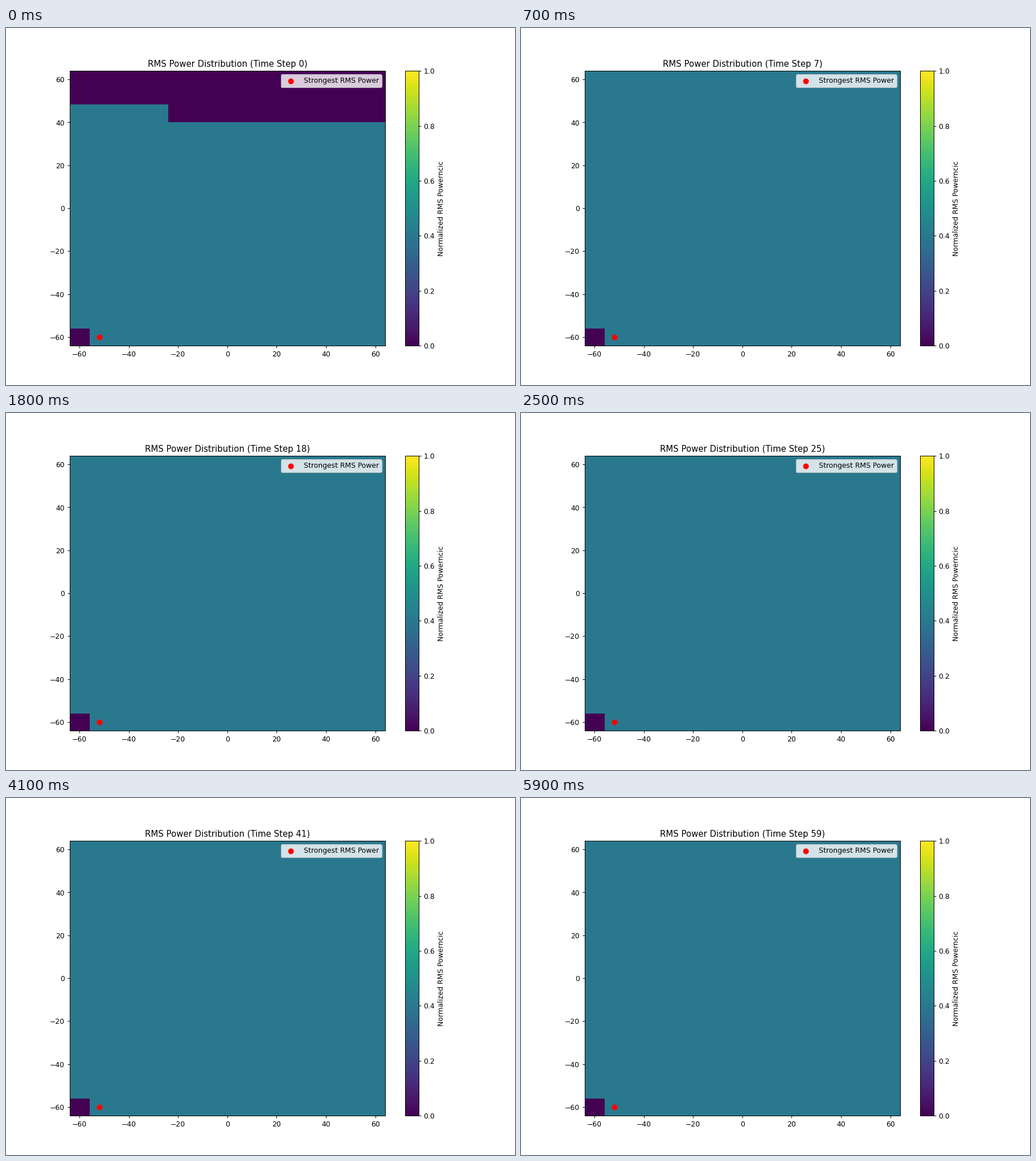
A matplotlib script that plays this animation: 894x626 px, repeating every 6 s.

```python
import numpy as np
import matplotlib.pyplot as plt
from matplotlib.animation import FuncAnimation

STEPS = 60
SIDE = 16           # sensors per row
HALF = 64           # half width of the field
BASE = 0.4          # steady power level
FIRST_REPORT = 213  # sensors heard from at the first step
PEAK_STEP = 11

plt.rcParams["font.family"] = "DejaVu Sans"


def power(step):
    """Normalized power of every sensor; sensor 0 stays silent."""
    cells = np.full(SIDE * SIDE, BASE)
    cells[0] = 0
    if step == 0:
        cells[FIRST_REPORT:] = 0
    if step == PEAK_STEP:
        cells[1] = 1
    return cells.reshape(SIDE, SIDE)


def strongest(grid):
    """Centre of the cell with the highest power."""
    row, col = np.unravel_index(grid.argmax(), grid.shape)
    size = 2 * HALF / SIDE
    return (col + 0.5) * size - HALF, (row + 0.5) * size - HALF


# 894 x 626 pixels
fig, ax = plt.subplots(figsize=(10, 7.0023), dpi=89.4)
image = ax.imshow(power(0), origin="lower", cmap="viridis", vmin=0, vmax=1,
                  extent=(-HALF, HALF, -HALF, HALF), aspect="auto",
                  interpolation="nearest")
fig.colorbar(image, ax=ax, label="Normalized RMS Powerncic")
marker = ax.scatter(*strongest(power(0)), color="red", s=50,
                    label="Strongest RMS Power")
ax.set_xlim(-HALF, HALF)
ax.set_ylim(-HALF, HALF)
ax.legend(loc="upper right")
title = ax.set_title("")


def update(step):
    grid = power(step)
    image.set_data(grid)
    marker.set_offsets([strongest(grid)])
    title.set_text(f"RMS Power Distribution (Time Step {step})")
    return image, marker, title


anim = FuncAnimation(fig, update, frames=STEPS, interval=100, repeat=True,
                     repeat_delay=0)
plt.show()
```
